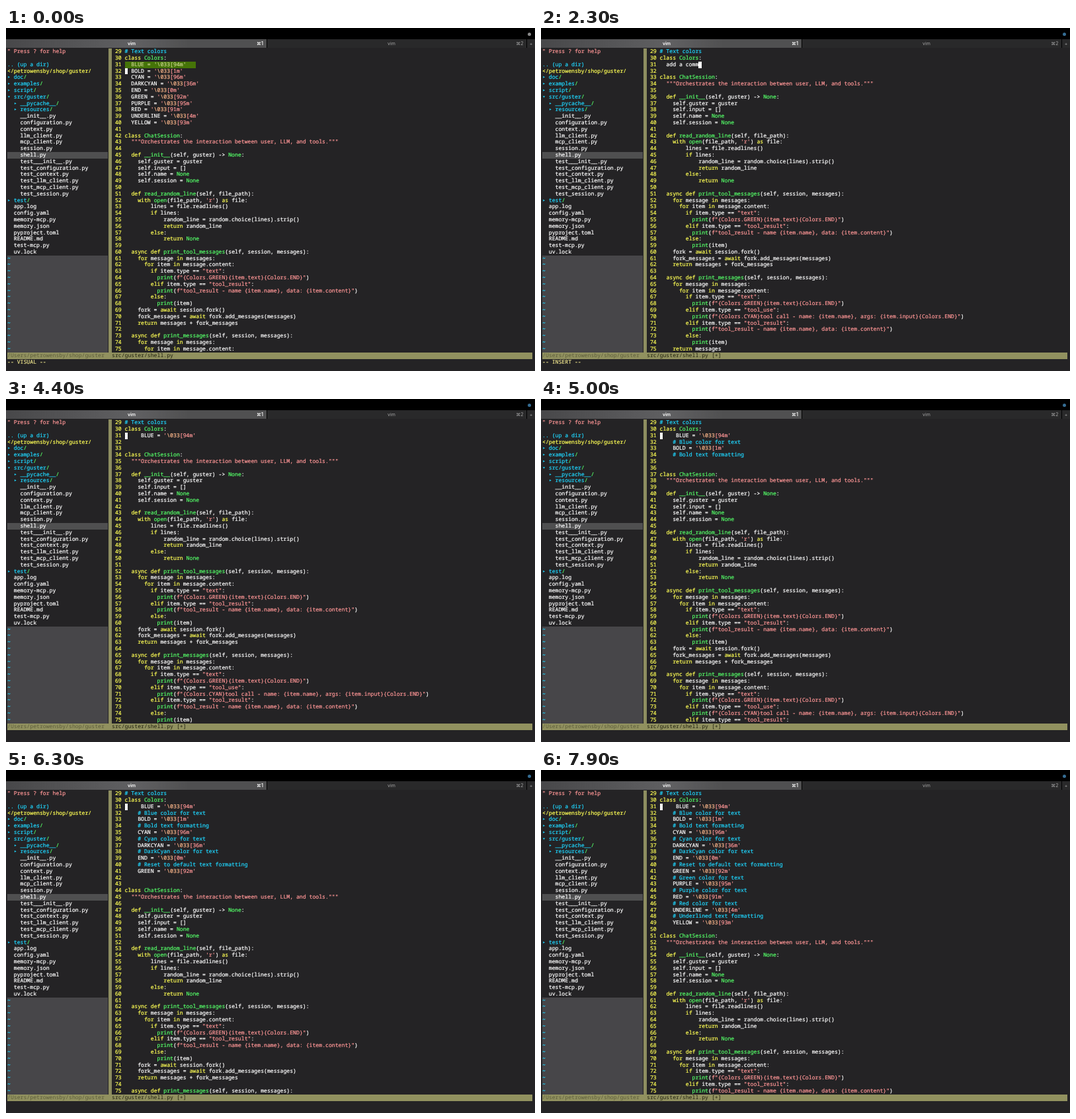
Recreate the animation shown at these times as an HTML page. Size 800 by 520 pixels, loop 8 s.

```html
<!DOCTYPE html>
<html lang="en">
<head>
<meta charset="utf-8">
<title>vim</title>
<style>
html, body { margin: 0; width: 100%; height: 100%; overflow: hidden; background: #000; }
#stage { position: relative; width: 800px; height: 520px; overflow: hidden; }
#stage > * { position: absolute; }
pre, .status { margin: 0; font: 8.17px/9.8px "Noto Sans Mono", "DejaVu Sans Mono", monospace; white-space: pre; text-rendering: geometricPrecision; font-variant-ligatures: none; color: #fff; }
pre { -webkit-text-stroke: .22px; }
#editor { left: 0; top: 30px; width: 800px; height: 490px; background: #242325; }
#empty { left: 2px; top: 345px; width: 152px; height: 147px; background: #474649; }
#row { left: 2px; top: 188px; width: 152px; height: 10px; background: #4f4f50; }
#split { left: 154.5px; top: 31px; width: 5px; height: 461px; background: #8d8d60; }
#bar { left: 2px; top: 491.8px; width: 794px; height: 9.8px; background: #91915f; }
#tree, #code { top: 31.2px; height: 460.6px; overflow: hidden; }
#tree { left: 2px; width: 152px; }
#code { left: 160px; width: 636px; }
.status { top: 491.8px; }
#dir { left: 2px; color: #5d5d3c; }
#name { left: 160px; color: #20200f; }
#mode { left: 2px; top: 501.6px; color: #ece28c; }
#cursor { width: 4.9px; height: 9.8px; background: #fff; }
.tab { top: 17px; height: 13px; background: #29292a; }
.tab.on { background: linear-gradient(90deg, #48484a, #606062 50%, #505051 70%); }
.label { top: 17px; font: 7px/13px Inter, "Noto Sans", sans-serif; color: #a5a5a5; transform: translateX(-50%); }
.label.on { color: #fff; font-weight: 600; }
#dot { left: 789px; top: 6.5px; width: 5px; height: 5px; border-radius: 50%; }
.num, .kw { color: #ffff55; }
.fn { color: #55ff68; }
.str { color: #ff9696; }
.esc { color: #ffb98c; }
.com { color: #1fd6ff; }
.sel { display: inline-block; height: 9.8px; vertical-align: top; background: #457408; }
.sel, .sel * { color: #c5d08a; }
</style>
</head>
<body>
<div id="stage">
  <div id="dot"></div>
  <div class="tab on" style="left:0;width:394px"></div>
  <div class="tab" style="left:395px;width:392px"></div>
  <div class="tab" style="left:788px;width:12px"></div>
  <span class="label on" style="left:190px">vim</span>
  <span class="label on" style="left:384px">⌘1</span>
  <span class="label" style="left:583px">vim</span>
  <span class="label" style="left:777px">⌘2</span>
  <span class="label" style="left:794px">+</span>
  <div id="editor"></div>
  <div id="empty"></div>
  <div id="row"></div>
  <div id="split"></div>
  <div id="bar"></div>
  <pre id="tree"></pre>
  <pre id="code"></pre>
  <div class="status" id="dir">/Users/petrowensby/shop/guster</div>
  <div class="status" id="name"></div>
  <pre id="mode"></pre>
  <div id="cursor"></div>
</div>
<script>
const CELL = 4.9, ROW = 9.8, ROWS = 47, FIRST = 29, LOOP = 8000;
const $ = id => document.getElementById(id);
const span = (cls, s) => `<span class="${cls}">${s}</span>`;

const tree = `" Press ? for help

.. (up a dir)
</petrowensby/shop/guster/
▸ doc/
▸ examples/
▸ script/
▾ src/guster/
  ▸ __pycache__/
  ▸ resources/
    __init__.py
    configuration.py
    context.py
    llm_client.py
    mcp_client.py
    session.py
    shell.py
    test___init__.py
    test_configuration.py
    test_context.py
    test_llm_client.py
    test_mcp_client.py
    test_session.py
▸ test/
  app.log
  config.yaml
  memory-mcp.py
  memory.json
  pyproject.toml
  README.md
  test-mcp.py
  uv.lock`.split("\n");

const rest = `class ChatSession:
  """Orchestrates the interaction between user, LLM, and tools."""

  def __init__(self, guster) -> None:
    self.guster = guster
    self.input = []
    self.name = None
    self.session = None

  def read_random_line(self, file_path):
    with open(file_path, 'r') as file:
        lines = file.readlines()
        if lines:
            random_line = random.choice(lines).strip()
            return random_line
        else:
            return None

  async def print_tool_messages(self, session, messages):
    for message in messages:
      for item in message.content:
        if item.type == "text":
          print(f"{Colors.GREEN}{item.text}{Colors.END}")
        elif item.type == "tool_result":
          print(f"tool_result - name {item.name}, data: {item.content}")
        else:
          print(item)
    fork = await session.fork()
    fork_messages = await fork.add_messages(messages)
    return messages + fork_messages

  async def print_messages(self, session, messages):
    for message in messages:
      for item in message.content:
        if item.type == "text":
          print(f"{Colors.GREEN}{item.text}{Colors.END}")
        elif item.type == "tool_use":
          print(f"{Colors.CYAN}tool call - name: {item.name}, args: {item.input}{Colors.END}")
        elif item.type == "tool_result":
          print(f"tool_result - name {item.name}, data: {item.content}")
        else:
          print(item)
    return messages`.split("\n");

// name, escape code, comment
const colors = [
  ["BLUE", 94, "Blue color for text"], ["BOLD", 1, "Bold text formatting"],
  ["CYAN", 96, "Cyan color for text"], ["DARKCYAN", 36, "DarkCyan color for text"],
  ["END", 0, "Reset to default text formatting"], ["GREEN", 92, "Green color for text"],
  ["PURPLE", 95, "Purple color for text"], ["RED", 91, "Red color for text"],
  ["UNDERLINE", 4, "Underlined text formatting"], ["YELLOW", 93, ""]
];
const assign = ([name, code]) => `${name} = '\\033[${code}m'`;
const before = colors.map(c => "  " + assign(c));
const after = colors.flatMap((c, i) => [(i ? "    " : "     ") + assign(c), "    # " + c[2]]).slice(0, -1);
const prompt = "add a comment per color";

const token = /(?<str>""".*"""|f?"[^"]*"|'[^']*')|(?<com>#.*)|(?<fn>(?<=\b(?:class|def) )\w+|\b(?:None|open|print)\b)|\b(?<kw>class|def|async|await|for|in|if|elif|else|return|with|as)\b/g;

function paint(line) {
  return line.replace(token, (s, ...args) => {
    const groups = args.at(-1);
    const cls = Object.keys(groups).find(k => groups[k] !== undefined);
    return span(cls, s.replace("\\033", span("esc", "\\033")));
  });
}

function paintTree(line, i) {
  const s = line.replace("<", "&lt;");
  if (i === 0) return span("str", s);
  if (i === 3) return span("kw", s);
  if (i === 2) return span("com", s);
  return s.endsWith("/") ? span("com", s.slice(0, -1)) + span("fn", "/") : s;
}

function stateAt(t) {
  if (t < 1250) {
    const all = t >= 1000;
    const line = Math.min(8, Math.floor(t / 110)) + 1;
    return { block: before, gap: 1, picked: all ? 10 : line, row: line + 2,
             col: all ? before[9].length : 0, mode: "VISUAL", dirty: false };
  }
  const count = Math.min(after.length, Math.floor((t - 4180) / 190));
  if (count > 0) {
    return { block: after.slice(0, count), gap: count < after.length ? 2 : 1,
             picked: 0, row: 2, col: 0, mode: "", dirty: true };
  }
  const typing = t < 3700;
  const typed = "  " + prompt.slice(0, Math.max(0, Math.floor((t - 1300) / 100)));
  return { block: [typed], gap: 1, picked: 0, row: 2, col: typing ? typed.length : 0,
           mode: typing ? "INSERT" : "", dirty: true };
}

function render(s) {
  const head = ["# Text colors", "class Colors:"];
  const lines = [...head, ...s.block, ...Array(s.gap).fill(""), ...rest].slice(0, ROWS);
  $("code").innerHTML = lines.map((line, i) => {
    const picked = i >= 2 && i < 2 + s.picked;
    const text = picked ? span("sel", paint(line) + "   ") : paint(line);
    return span("num", ` ${FIRST + i} `) + text;
  }).join("\n");
  $("cursor").style.left = 160 + (4 + s.col) * CELL + "px";
  $("cursor").style.top = 31.2 + s.row * ROW + "px";
  $("mode").textContent = s.mode && `-- ${s.mode} --`;
  $("name").textContent = "src/guster/shell.py" + (s.dirty ? " [+]" : "");
}

$("tree").innerHTML = [...tree.map(paintTree), ...Array(ROWS - tree.length).fill(span("com", "~"))].join("\n");

const start = performance.now();
let shown = "";
function frame() {
  const t = (performance.now() - start) % LOOP;
  const state = stateAt(t), key = JSON.stringify(state);
  if (key !== shown) render(state);
  shown = key;
  $("dot").style.background = t < 100 ? "#8a8a8a" : "#356d94";
  requestAnimationFrame(frame);
}
frame();
</script>
</body>
</html>
```
